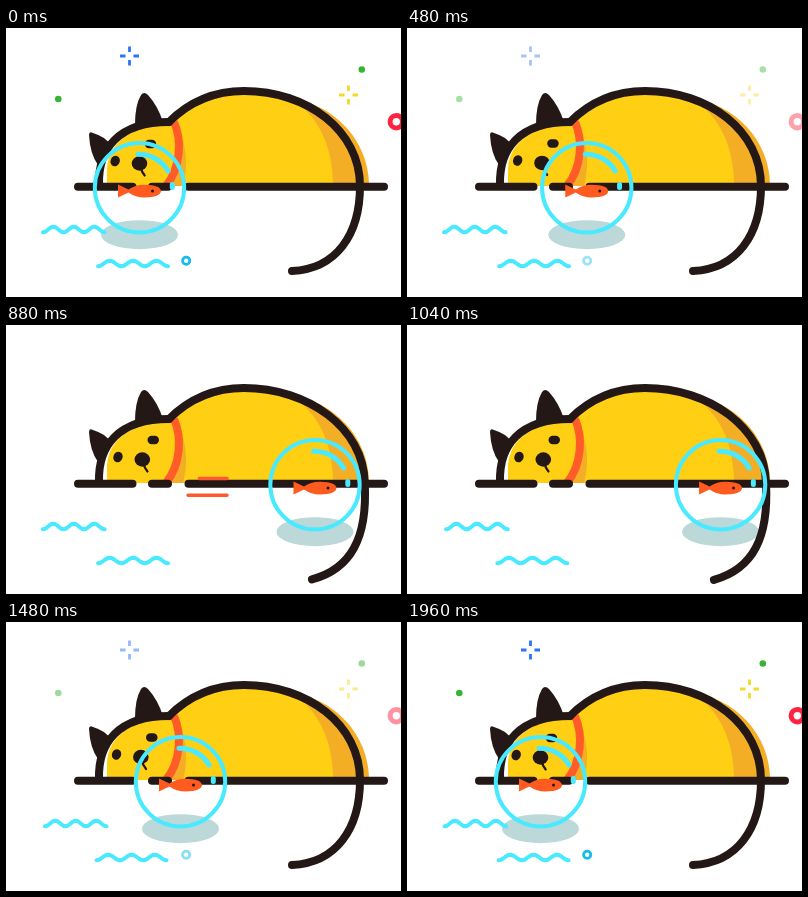
Write an HTML page that moves like this. It is 395x269 px and loops after 2000 ms.

```html
<!DOCTYPE html>
<html>
<head>
<meta charset="utf-8">
<style>
html, body { margin: 0; width: 100%; height: 100%; overflow: hidden; background: #fff; }
svg { display: block; width: 395px; height: 269px; }
.line { fill: none; stroke-linecap: round; stroke-linejoin: round; }
.ink { stroke: #231815; stroke-width: 8; }
.water { stroke: #49eaff; stroke-width: 4; }
.speed { stroke: #ff5a2d; stroke-width: 3.5; }
</style>
</head>
<body>
<svg viewBox="0 0 395 269">
  <defs><path id="star" d="M0-9.5V-4M0 4V9.5M-9.5 0H-4M4 0H9.5" fill="none" stroke-width="2.8"/></defs>

  <g id="sparks">
    <use href="#star" x="123.5" y="28" stroke="#2a76f4"/>
    <use href="#star" x="342.5" y="67" stroke="#f4d92b"/>
    <circle cx="52.3" cy="71" r="3.3" fill="#35b535"/>
    <circle cx="355.8" cy="41.5" r="3.3" fill="#35b535"/>
    <circle cx="390.3" cy="93.7" r="6.2" fill="none" stroke="#ff2340" stroke-width="5"/>
    <circle cx="180.2" cy="232.8" r="3.6" fill="none" stroke="#16bcec" stroke-width="2.8"/>
  </g>

  <ellipse id="shadow" cy="206.7" rx="38.5" ry="14.5" fill="#bcd8d8"/>
  <path id="wave1" class="line water"/>
  <path id="wave2" class="line water"/>

  <!-- body -->
  <path d="M280 69C330 76 362 113 363 156H300Z" fill="#f3ae25"/>
  <path d="M160 158V97C185 73 208 63 238 63C262 63 280 68 291 75C316 93 327 124 327 158Z" fill="#ffcf13"/>
  <path d="M168 95C178 106 184 132 177 158H160Z" fill="#f3ae25"/>
  <path d="M101 158V140C103 114 125 97 166 96C176 115 173 144 160 158Z" fill="#ffcf13"/>
  <path d="M168 94C176 112 175 139 160 158" fill="none" stroke="#ff5c28" stroke-width="8"/>
  <path id="back" class="line ink"/>
  <path d="M93 157C92 121 112 94 163 94" class="line ink"/>
  <path d="M83 107Q83 103 87 105Q98 108 105 117L92 137Q84 126 83 107Z" fill="#231815"/>
  <path d="M129 97Q129 77 135 67Q138 63 142 67Q152 78 157 94Z" fill="#231815"/>

  <path d="M72 158.7H126.5M146 158.7H162M182.500 158.7H378" class="line ink"/>

  <g id="face" fill="#231815">
    <ellipse cx="112" cy="132" rx="4.6" ry="5.4" transform="rotate(20 112 132)"/>
    <rect x="141.500" y="110.700" width="11.500" height="8.600" rx="4.200"/>
    <ellipse cx="136.3" cy="134.500" rx="7.800" ry="7.200"/>
    <path d="M137.500 138Q138 142 141.500 146.500" class="line" stroke="#231815" stroke-width="2.200"/>
  </g>

  <path id="speed" class="line speed"/>

  <g id="bowl">
    <path d="M-21.500 156.500L-11 161.500Q-4 156.500 5 156.700Q21 157 21.500 163Q21 169.300 5 169.500Q-4 169.500-11 164.500L-21.500 169.500Z" fill="#ff5a1f"/>
    <circle cx="13" cy="163" r="1.500" fill="#231815"/>
    <circle cy="159.700" r="44.700" class="line water"/>
    <path d="M-1.500 126.300A33.500 33.500 0 0 1 28.500 143M32.800 156.500V159.500" class="line water" stroke-width="5" style="stroke-width:5"/>
  </g>
</svg>
<script>
const LOOP = 2000, STEP = 40;
const el = id => document.getElementById(id);
const draw = (id, d) => el(id).setAttribute('d', d);
const clamp = v => Math.min(1, Math.max(0, v));
const ramp = (t, a, b) => clamp((t - a) / (b - a));
const smooth = u => (1 - Math.cos(Math.PI * u)) / 2;

// Hermite curve through [time, value, slope per ms]
function curve(keys, t) {
  if (t <= keys[0][0]) return keys[0][1];
  for (let i = 1; i < keys.length; i++) {
    const [a, p, m] = keys[i - 1], [b, q, n] = keys[i];
    if (t > b) continue;
    const d = b - a, u = (t - a) / d, v = 1 - u;
    return p * v * v * (1 + 2 * u) + q * u * u * (3 - 2 * u) + d * u * v * (m * v - n * u);
  }
  return keys[keys.length - 1][1];
}

const roll = [[0, 133.5, 0], [320, 152.5, .13], [640, 227, .38], [880, 309, .08],
  [1000, 313, 0], [1200, 305, -.22], [1480, 174.5, -.34], [1960, 133.5, 0]];
const swing = [[720, 0, 0], [880, .95, .001], [1000, 1, 0], [1120, .85, -.004], [1200, 0, 0]];

function wave(x, y, length) {
  let d = '';
  for (let i = 0; i <= 48; i++)
    d += (i ? 'L' : 'M') + (x + length * i / 48) + ' ' + (y + 2.8 * Math.cos(i * Math.PI / 8));
  return d;
}

function backPath(s) {
  return `M163 94C186 71 211 63 238 63C302 63 ${354 + 4 * s} 103 ${354 + 5 * s} 158` +
    `C${354 + 8 * s} ${207 + 6 * s} ${330 + 16 * s} ${241 + 3 * s} ${286 + 21 * s} ${243 + 12 * s}`;
}

function speedPath(t) {
  if (t < 540 || t > 1020) return '';
  const head = 127 + 94 * ramp(t, 540, 880);
  const dash = (y, from) => from < head ? `M${from} ${y}H${head}` : '';
  return dash(153.5, 127 + 94 * ramp(t, 640, 980)) + dash(170.3, 127 + 94 * ramp(t, 640, 1050));
}

function frame(now) {
  const t = Math.floor(now % LOOP / STEP) * STEP;
  const x = curve(roll, t);
  el('bowl').setAttribute('transform', `translate(${x})`);
  el('shadow').setAttribute('cx', x);

  const look = 1 - ramp(x, 133.5, 220);
  el('face').setAttribute('transform', `translate(${-2.8 * look} ${look})`);

  draw('back', backPath(curve(swing, t)));
  draw('speed', speedPath(t));

  const sway = 1.2 * Math.cos(2 * Math.PI * (t / 400 - .1));
  draw('wave1', wave(38 - sway, 201.5, 61.5));
  draw('wave2', wave(91.3 + sway * .8, 235.5, 70));

  el('sparks').setAttribute('opacity',
    1 - smooth(ramp(t, 0, 880)) + smooth(ramp(t, 1100, 1860)));
  requestAnimationFrame(frame);
}
frame(performance.now());
</script>
</body>
</html>
```
